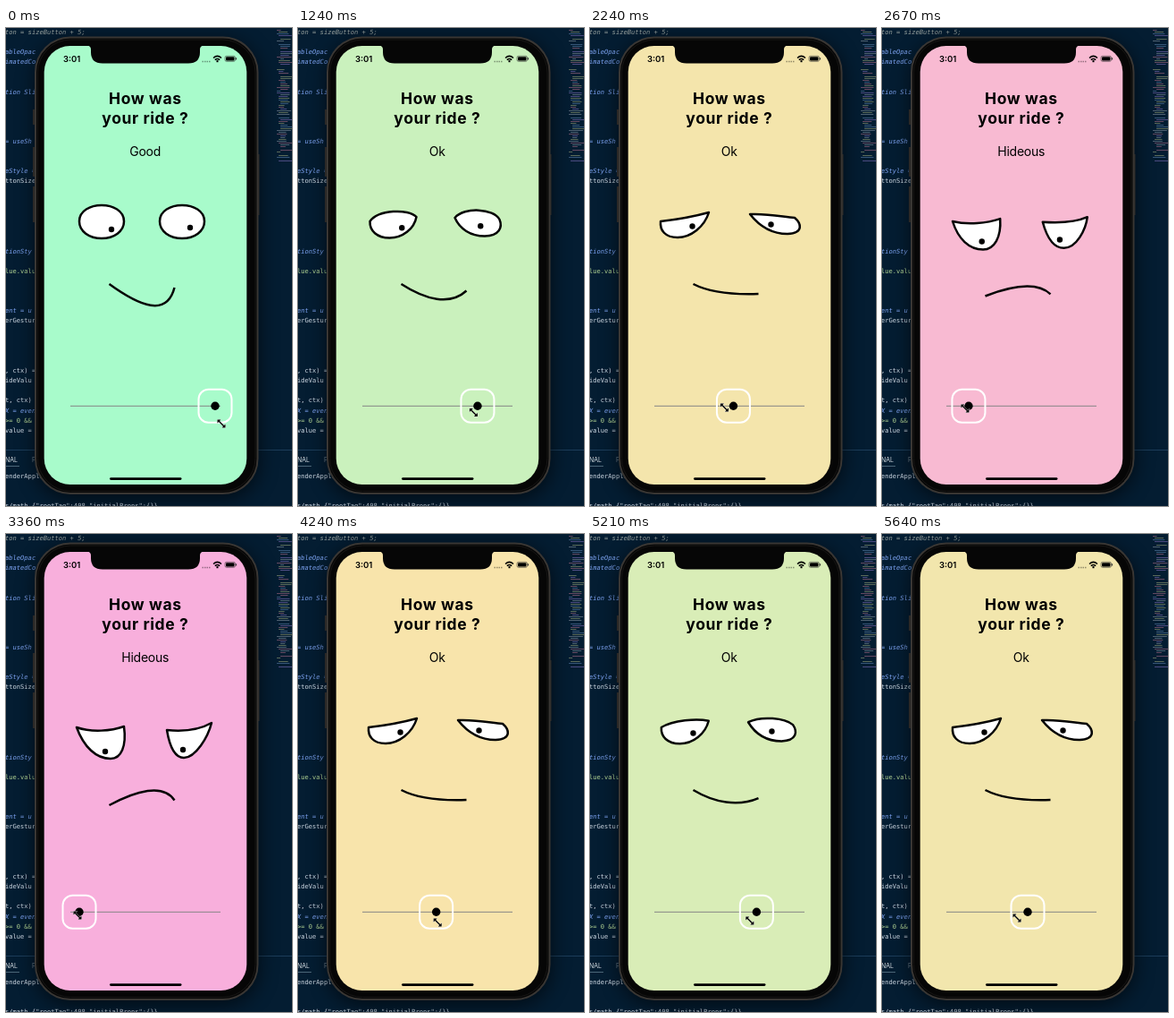
Animation, 320 px wide and 534 px high, one loop 5670 ms. Source, as an HTML page:

```html
<!DOCTYPE html>
<html lang="en">
<head>
<meta charset="utf-8">
<title>Ride rating slider</title>
<style>
  html, body { margin: 0; width: 100%; height: 100%; overflow: hidden; background: #041d32; }
  svg { display: block; width: 100vw; height: 100vh; }
  .ui { font-family: Inter, Roboto, sans-serif; }
  .code { font-family: "DejaVu Sans Mono", "Noto Sans Mono", monospace; font-size: 7.1px; }
  .ink { stroke: #050505; stroke-width: 2.5; stroke-linejoin: round; }
</style>
</head>
<body>
<svg viewBox="0 0 320 534">
  <defs>
    <filter id="blur" x="-20%" y="-20%" width="140%" height="140%"><feGaussianBlur stdDeviation="11"/></filter>
  </defs>
  <rect width="320" height="534" fill="#041d32"/>
  <g id="map"></g>
  <path d="M0 471.5H320" stroke="#1c3d5a"/>
  <g id="editor" class="code"></g>
  <g class="ui" font-size="7" fill="#d5dde2"><text x="-3" y="485">INAL</text><text x="29" y="485" fill="#71818e">F</text></g>
  <path d="M0 489.500H15" stroke="#6d8799" stroke-width=".7"/>

  <g id="phone">
    <rect x="33" y="14" width="250" height="512" rx="40" opacity=".6" filter="url(#blur)"/>
    <path d="M31.5 91V108M31.5 133V166M31.5 177V217M282 141V209" stroke="#2b2927" stroke-width="3"/>
    <rect x="33" y="10.5" width="248.500" height="509.500" rx="39" fill="#060606" stroke="#393633" stroke-width="2"/>
    <rect x="35.500" y="13" width="243.500" height="504.500" rx="37" fill="none" stroke="#171615"/>
    <rect id="screen" x="42.700" y="20" width="226.600" height="490" rx="29"/>
    <path d="M91 19.500H221Q217 20 217 24V27Q217 39.500 204 39.500H108Q95 39.500 95 27V24Q95 20 91 19.500Z" fill="#060606"/>
    <rect x="116" y="502.200" width="80.500" height="2.800" rx="1.400"/>
  </g>

  <g id="status">
    <text class="ui" x="64" y="38" font-size="9.500" font-weight="600">3:01</text>
    <path d="M219.500 37.500H229" stroke="#000" stroke-opacity=".4" stroke-width="1.500" stroke-dasharray="1.500 1"/>
    <g fill="none" stroke="#000" stroke-width="1.500">
      <path d="M232 33.500Q236.500 29.300 241 33.500M233.800 35.600Q236.500 33.300 239.200 35.600"/>
      <path d="M236.500 36V38.200" stroke-width="2"/>
      <rect x="245" y="31.300" width="11.500" height="6" rx="1.800" stroke="#333" stroke-width=".6"/>
    </g>
    <rect x="246" y="32.200" width="9.500" height="4.200" rx="1"/>
    <path d="M257.600 33.200V35.500" stroke="#333"/>
  </g>

  <g class="ui" text-anchor="middle">
    <g font-size="17.500" font-weight="700" letter-spacing=".6">
      <text x="155.900" y="85.300">How was</text>
      <text x="155.900" y="107">your ride ?</text>
    </g>
    <text id="label" x="155.700" y="143.200" font-size="14" letter-spacing="-.25"></text>
  </g>

  <g class="ink">
    <path id="leftEye" fill="#fff"/>
    <path id="rightEye" fill="#fff"/>
    <path id="mouth" fill="none"/>
  </g>
  <circle id="leftPupil" r="3.200"/>
  <circle id="rightPupil" r="3.200"/>

  <path d="M72 422.300H240" stroke="#858585"/>
  <g id="knob">
    <rect x="-18.500" y="-18.500" width="37" height="37" rx="11" fill="none" stroke="#fff" stroke-width="2"/>
    <circle r="4.700"/>
  </g>
  <path id="cursor" d="M-4.500 -4.500H-.5L-2 -3L3 2L4.500 .5V4.500H.5L2 3L-3 -2L-4.500 -.5Z"
        stroke="#fff" stroke-opacity=".7" stroke-width=".9" paint-order="stroke"/>
</svg>
<script>
const LOOP = 5670;
const MIN_X = 82, MAX_X = 234;
const SHAPE_REST = [154, 168], COLOR_REST = [154, 157]; // knob spans that hold the middle pose
const $ = id => document.getElementById(id);

function add(parent, tag, attrs, text = "") {
  const node = document.createElementNS("http://www.w3.org/2000/svg", tag);
  for (const key in attrs) node.setAttribute(key, attrs[key]);
  node.textContent = text;
  parent.append(node);
}

// Editor lines: baseline, colour, text
const BLUE = "#7ea4f2", GREY = "#d0d9e4", GREEN = "#b3d494", DIM = "#9aa3a0";
[
  [7, DIM, "ton = sizeButton + 5;"],
  [29, BLUE, "ableOpac"], [40, BLUE, "imatedCo"], [73.5, BLUE, "tion Sli"],
  [129, BLUE, "= useSh"], [162, BLUE, "eStyle ="], [173, GREY, "ttonSize"],
  [251.5, BLUE, "tionSty"], [273.5, GREEN, "lue.valu"],
  [318, BLUE, "ent = u"], [329, GREY, "erGestur"],
  [385, GREY, ", ctx) ="], [396, GREY, "ideValu"],
  [418, GREY, "t, ctx)"], [430, BLUE, "X = even"],
  [441, GREEN, ">= 0 &&"], [452, GREY, "value ="],
  [503, GREY, "enderAppli"],
  [536, GREY, 's/math {"rootTag":408,"initialProps":{}}']
].forEach(([y, fill, text]) =>
  add($("editor"), "text", {
    x: -1, y, fill, "font-style": fill === BLUE || fill === DIM ? "italic" : "normal"
  }, text));

// Minimap: short seeded dashes
let seed = 11;
const random = () => (seed = seed * 16807 % 2147483647) / 2147483647;
const mapColors = ["#3c5c80", "#55508a", "#65745f", "#586978", "#704f68"];
for (let y = 0; y < 150; y += 2) {
  if (random() < .12) continue;
  const x = 303 + Math.floor(random() * 3) * 2;
  add($("map"), "rect", {
    x, y, width: 4 + random() * 13, height: 1,
    fill: mapColors[Math.floor(random() * 5)], opacity: .9
  });
}

// Time, knob x, cursor offset x and y
const track = [
  [0, 234, 7, 20], [600, 234, 6, 19], [1200, 203, -4, 8], [1850, 172, -11, 2],
  [2250, 160, -10, 2], [2670, 97, -4, 3], [3000, 84, -3, 3], [3360, 82, -2, 4],
  [3750, 84, -1, 8], [4240, 154.5, 1.5, 12], [4520, 201, 6, 16], [4800, 231, 7, 18],
  [4980, 229, 2, 15], [5350, 166, -11, 8], [5640, 163, -12, 7], [5670, 163, -12, 7]
];

// Monotone cubic through one column of the track
function sample(t, col) {
  const slope = i => {
    const a = track[i], b = track[i + 1];
    return a && b ? (b[col] - a[col]) / (b[0] - a[0]) : 0;
  };
  const tangent = i => {
    const p = slope(i - 1), q = slope(i);
    return p * q > 0 ? 2 * p * q / (p + q) : 0;
  };
  const i = track.findIndex((k, n) => n + 1 < track.length && t < track[n + 1][0]);
  const a = track[i], b = track[i + 1];
  const h = b[0] - a[0], u = (t - a[0]) / h, v = 1 - u;
  return a[col] * (1 + 2 * u) * v * v + b[col] * u * u * (3 - 2 * u)
    + h * u * v * (tangent(i) * v - tangent(i + 1) * u);
}

// Poses for bad, ok and good; eyes are start + three cubics
const poses = {
  leftEye: [
    "M79 216C96 222 118 220 132 215C135 237 129 251 117 251C101 251 87 238 79 216Z",
    "M79 216C97 214 115 211 133 206C128 222 113 234 98 234C84 234 78 226 79 216Z",
    "M82 216C82 192 132 192 132 216C132 227 121 235 107 235C93 235 82 227 82 216Z"
  ],
  rightEye: [
    "M180 219C200 221 216 219 230 211C226 227 212 250 199 250C189 250 183 237 180 219Z",
    "M179 208C200 207 216 211 229 212C236 218 240 229 221 230C203 230 190 222 179 208Z",
    "M172 216C172 192 222 192 222 216C222 227 211 235 197 235C183 235 172 227 172 216Z"
  ],
  mouth: [
    "M115.500 303C145 287 176 278 188.500 297.500",
    "M115.500 286C135 296 160 298 188.500 297",
    "M115.500 286C150 311 180 323 188.500 290"
  ],
  leftPupil: ["translate(111 243)", "translate(114.5 221.5)", "translate(118 225)"],
  rightPupil: ["translate(198 241)", "translate(202.5 219.5)", "translate(206 223)"],
  screen: ["rgb(248,175,220)", "rgb(248,228,171)", "rgb(168,251,203)"]
};
const attribute = { leftPupil: "transform", rightPupil: "transform", screen: "fill" };

function blend(from, to, u) {
  const ends = to.match(/[\d.]+/g);
  let i = 0;
  return from.replace(/[\d.]+/g, n => +(+n + (ends[i++] - n) * u).toFixed(2));
}

function poseAt([bad, ok, good], x, [low, high]) {
  return x < low
    ? blend(bad, ok, (x - MIN_X) / (low - MIN_X))
    : blend(ok, good, Math.max(0, (x - high) / (MAX_X - high)));
}

function draw(time) {
  const t = time % LOOP;
  const x = sample(t, 1);
  for (const id in poses) {
    const rest = id === "screen" ? COLOR_REST : SHAPE_REST;
    $(id).setAttribute(attribute[id] || "d", poseAt(poses[id], x, rest));
  }
  $("label").textContent = x < 112 ? "Hideous" : x > 210 ? "Good" : "Ok";
  $("knob").setAttribute("transform", `translate(${x} 422.300)`);
  $("cursor").setAttribute("transform", `translate(${x + sample(t, 2)} ${422 + sample(t, 3)})`);
}

const start = performance.now();
function tick() {
  draw(performance.now() - start);
  requestAnimationFrame(tick);
}
tick();
</script>
</body>
</html>
```
